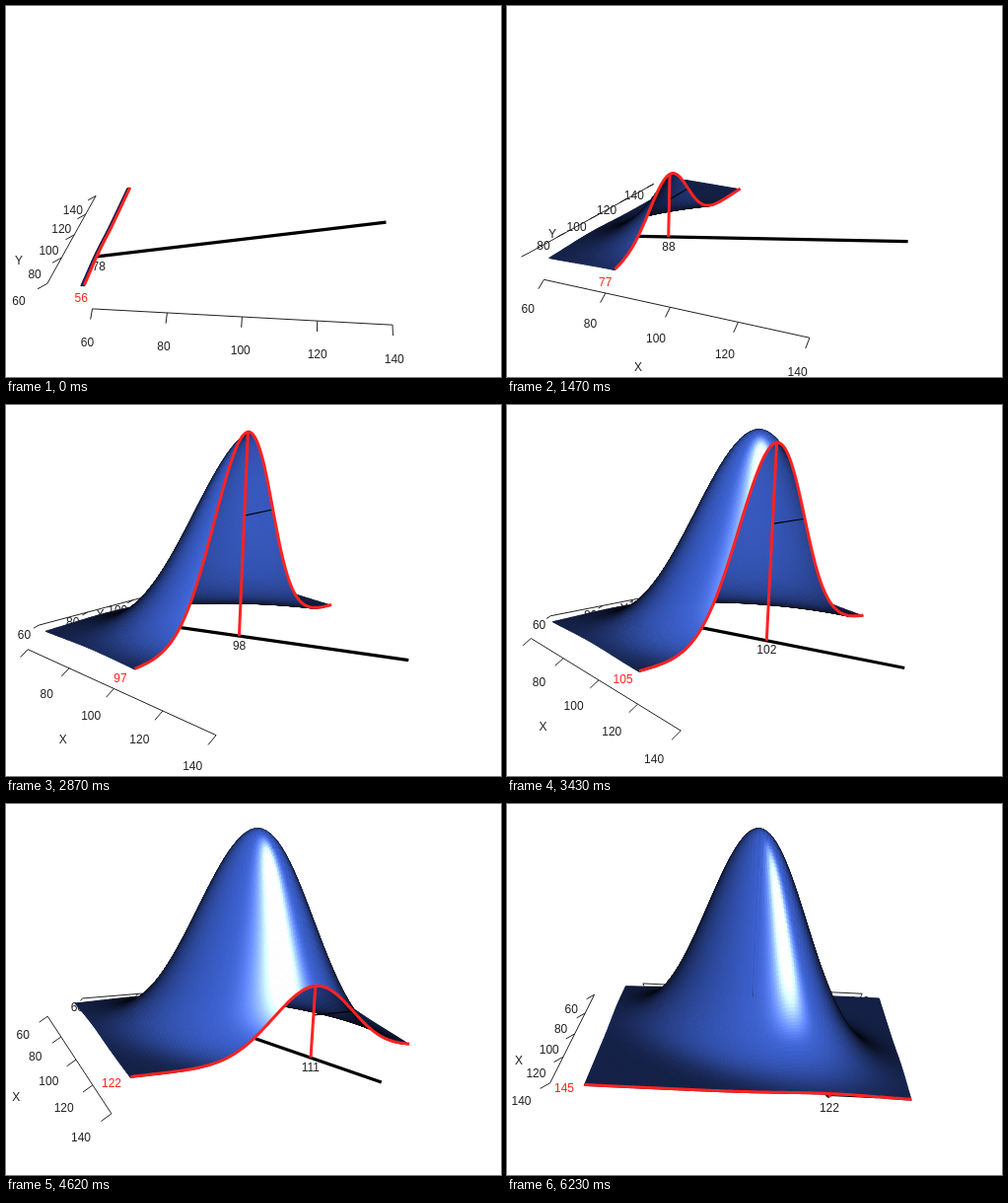
An HTML page with a canvas that plays this animation: 502x376 px, repeating every 6300 ms.

```html
<!DOCTYPE html>
<html lang="en">
<head>
<meta charset="utf-8">
<title>Conditional distribution</title>
<style>
  html, body { margin: 0; width: 100%; height: 100%; overflow: hidden; background: #fff; }
  canvas { display: block; }
</style>
</head>
<body>
<canvas id="stage" width="502" height="376"></canvas>
<script>
const W = 502, H = 376, STEP = 70, COUNT = 90;
const ctx = document.getElementById('stage').getContext('2d');
const RED = '#f22', INK = '#000', SOFT = '#222';
const rad = deg => deg * Math.PI / 180;

// Camera: tilt, roll, distance and focal length, in units of half the data range
const TILT = rad(17.8), ROLL = rad(2.65), DIST = 7.374, FOCAL = 1084;
const ct = Math.cos(TILT), st = Math.sin(TILT);
const cr = Math.cos(ROLL), sr = Math.sin(ROLL);
const FLOOR = -0.337, PEAK = 1.458, LIFT = 0.006;
const SIDE = 1.23, AXIS_Z = -0.378;
const TICKS = [60, 80, 100, 120, 140];
const CELLS = 90;
let ca = 1, sa = 0;

const unit = x => (x - 100) / 45;

function project(u, v, w) {
  const right = u * ca + v * sa, away = v * ca - u * sa;
  const k = FOCAL / (DIST + away * ct - w * st);
  const x = right * k - 2, y = 1.2 - (away * st + w * ct) * k;
  return [W / 2 + x * cr - y * sr, H / 2 + x * sr + y * cr];
}

// Bivariate normal, sd 15, correlation 0.5
const bell = (u, v) => PEAK * Math.exp(-6 * (u * u - u * v + v * v));
const onBell = (u, v, lift = 0) => project(u, v, FLOOR + bell(u, v) + lift);

function line(points, color, width) {
  ctx.beginPath();
  points.forEach(p => ctx.lineTo(p[0], p[1]));
  ctx.strokeStyle = color;
  ctx.lineWidth = width;
  ctx.stroke();
}

// Labels that start outside the stage are dropped whole
function label(text, p, color = SOFT) {
  const x = p[0] - ctx.measureText(text).width / 2 + 0.5, y = p[1] + 4.6;
  if (x < 0 || y > H) return;
  ctx.fillStyle = color;
  ctx.fillText(text, x, y);
}

// place(along, out, down) maps axis coordinates to the screen
function axis(title, place) {
  line([place(unit(60), 0, 0), place(unit(140), 0, 0)], SOFT, 1);
  for (const t of TICKS) {
    const a = unit(t);
    line([place(a, 0, 0), place(a, 0.062, 0.04)], SOFT, 1);
    label(String(t), place(a, 0.185, 0.125));
  }
  label(title, place(0, 0.4, 0.215));
}

// Cosine between the surface normal and the view, which is also the light
function facing(u, v) {
  const z = bell(u, v);
  const gu = 6 * z * (2 * u - v), gv = 6 * z * (2 * v - u);
  return Math.abs(gu * ct * sa - gv * ct * ca + st) / Math.hypot(gu, gv, 1);
}

function tint(lit) {
  const shine = 255 * Math.pow(lit, 50);
  const mix = c => Math.min(255, Math.round(c * lit + shine));
  return `rgb(${mix(65)},${mix(105)},${mix(225)})`;
}

// A cell around (u, v) with half size s; bright ones are split once
function cell(u, v, s, split) {
  const lit = facing(u, v);
  if (split && lit > 0.92) {
    const h = s / 2;
    for (const dv of [h, -h]) for (const du of [-h, h]) cell(u + du, v + dv, h, false);
    return;
  }
  const corners = [onBell(u - s, v - s), onBell(u + s, v - s), onBell(u + s, v + s), onBell(u - s, v + s)];
  ctx.fillStyle = ctx.strokeStyle = tint(lit);
  ctx.beginPath();
  for (const p of corners) ctx.lineTo(p[0], p[1]);
  ctx.closePath();
  ctx.fill();
  ctx.stroke();
}

// Rows are painted from the farthest to the nearest as seen by the eye
function surface(x0) {
  const eye = -DIST * ct * ca, s = 1 / CELLS;
  const rows = Array.from({ length: CELLS }, (_, j) => (2 * j + 1) * s - 1);
  rows.sort((a, b) => Math.abs(b - eye) - Math.abs(a - eye));
  ctx.lineWidth = 1;
  for (const v of rows)
    for (let x = 55.5; x < x0; x++) cell(unit(x), v, s, true);
}

// Lowest u at which the floor line still shows through the cut at u0
function lineStart(u0) {
  const eu = DIST * ct * sa, ev = -DIST * ct * ca, rise = DIST * st - FLOOR;
  let u = u0;
  while (u > -1) {
    const next = u - 0.004, v = next / 2;
    const k = (u0 - next) / (eu - next);
    if (k * rise > bell(u0, v + k * (ev - v))) break;
    u = next;
  }
  return u;
}

function draw(n) {
  const x0 = 56 + n, u0 = unit(x0), mean = u0 / 2, sd = Math.sqrt(0.75) / 3;
  ca = Math.cos(rad(n + 1));
  sa = Math.sin(rad(n + 1));
  ctx.fillStyle = '#fff';
  ctx.fillRect(0, 0, W, H);
  ctx.font = '12px "Liberation Sans", Arial, sans-serif';
  ctx.lineJoin = 'round';

  axis('Y', (a, out, down) => project(-SIDE - out, a, AXIS_Z - down));
  surface(x0);
  axis('X', (a, out, down) => project(a, -SIDE - out, AXIS_Z - down));

  const start = lineStart(u0), foot = project(u0, mean, FLOOR);
  line([project(start, start / 2, FLOOR), project(1, 0.5, FLOOR)], INK, 3.2);

  const my = 100 + (x0 - 100) / 2;
  const shown = my % 1 ? 2 * Math.round(my / 2) : my; // halves go to even
  label(String(shown), project(u0, mean, FLOOR - 0.066));
  label(String(x0), project(u0, -1.125, FLOOR - 0.02), RED);

  const mid = FLOOR + bell(u0, mean) * Math.exp(-0.5);
  line([project(u0, mean, mid), project(u0, mean + sd, mid)], INK, 1.1);
  line([foot, onBell(u0, mean, LIFT)], RED, 3);
  const curve = [];
  for (let i = 0; i <= 120; i++) curve.push(onBell(u0, i / 60 - 1, LIFT));
  line(curve, RED, 3);
}

let last = -1;
function tick() {
  const n = Math.floor(performance.now() / STEP) % COUNT;
  if (n !== last) draw(last = n);
  requestAnimationFrame(tick);
}
tick();
</script>
</body>
</html>
```
